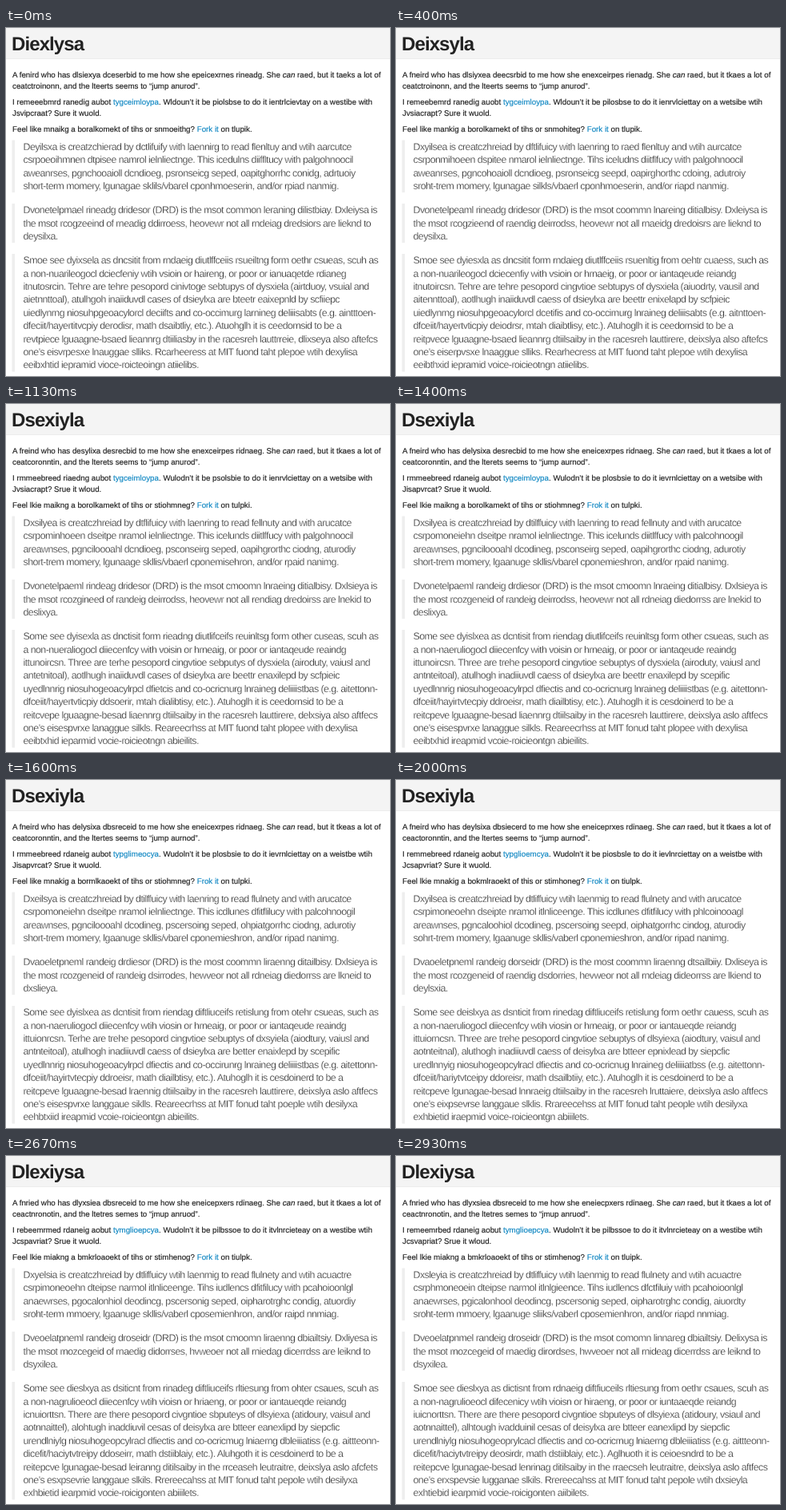
These frames come from a looping animation (480x436 px, 2.99 s). An HTML page:

```html
<!DOCTYPE html>
<html lang="en">
<head>
<meta charset="utf-8">
<title>Jumping letters</title>
<style>
html, body { margin: 0; width: 100%; height: 100%; overflow: hidden; background: #fff; }
svg { display: block; width: 480px; height: 436px; }
text { font-family: "Liberation Sans", Arial, sans-serif; text-rendering: geometricPrecision; white-space: pre; fill: currentColor; }
.title { font-size: 24px; font-weight: 700; letter-spacing: -.9px; color: #222; }
.body { font-size: 9.77px; color: #1c1c1c; stroke: currentColor; stroke-width: .14px; }
/* the white outline thins the letters to a light weight */
.quote { font-size: 12.4px; letter-spacing: -.565px; color: #222; stroke: #fff; stroke-width: .3px; }
.link { color: #0a84c1; fill: currentColor; stroke: currentColor; }
.em { font-style: italic; }
</style>
</head>
<body>
<svg id="page" viewBox="0 0 480 436">
  <rect width="480" height="38" fill="#f4f4f4"/>
  <rect y="38" width="480" height="1" fill="#ececec"/>
  <g fill="#eee">
    <rect x="7.5" y="140.5" width="3.5" height="65.6"/>
    <rect x="7.5" y="220" width="3.5" height="49.2"/>
    <rect x="7.5" y="283" width="3.5" height="147.6"/>
  </g>
</svg>
<script>
// Poses of the text: *italic*, [link]
const poses = [
`Diexlysa
A fenird who has dlsiexya dceserbid to me how she epeicexrnes rineadg. She *can* raed, but it taeks a lot of
ceatctroinonn, and the lteerts seems to “jump anurod”.
I remeeebmrd ranedig aubot [tygceimloypa]. Wldoun’t it be piolsbse to do it ientrlcievtay on a westibe with
Jsvipcraat? Sure it wuold.
Feel like mnaikg a boralkomekt of tihs or snmoeithg? [Fork it] on tlupik.
Deyilsxa is creatzchierad by dctlifuify with laennirg to read flenltuy and wtih aarcutce
csrpoeoihmnen dtpisee namrol ielnliectnge. This icedulns diiffltucy with palgohnoocil
aweanrses, pgnchooaioll dcndioeg, psronseicg seped, oapitghorrhc conidg, adrtuoiy
short-term momery, lgunagae sklils/vbarel cponhmoeserin, and/or rpiad nanmig.
Dvonetelpmael rineadg dridesor (DRD) is the msot common leraning dilistbiay. Dxleiysa is
the msot rcogzeeind of rneadig ddirroess, heovewr not all rndeiag dredsiors are lieknd to
deysilxa.
Smoe see dyixsela as dncsitit from rndaeig diutlffceiis rsueiltng form oethr csueas, scuh as
a non-nuarileogocl dciecfeniy wtih vsioin or haireng, or poor or ianuaqetde rdianeg
itnutosrcin. Tehre are tehre pesopord cinivtoge sebtupys of dysxiela (airtduoy, vsuial and
aietnnttoal), atulhgoh inaiiduvdl cases of dsieylxa are bteetr eaixepnld by scfiiepc
uiedlynrng niosuhpgeoacylorcl deciifts and co-occimurg larnineg deliiisabts (e.g. aintttoen-
dfeciit/hayertitvcpiy derodisr, math dsaibtliy, etc.). Atuohglh it is ceedornsid to be a
revtpiece lguaagne-bsaed lieannrg dtiiliasby in the racesreh lauttrreie, dlixseya also aftefcs
one’s eisvrpesxe lnauggae slliks. Rcarheeress at MIT fuond taht plepoe wtih dexylisa
eeibxhtid iepramid vioce-roicteoingn atiielibs.`,
`Deixsyla
A fneird who has dlsiyxea deecsrbid to me how she enexceirpes rienadg. She *can* raed, but it tkaes a lot of
ceatctroinonn, and the lteerts seems to “jump anurod”.
I remeebemrd ranedig auobt [tygceimloypa]. Wldoun’t it be pilosbse to do it ienrvlciettay on a wetsibe wtih
Jvsiacrapt? Sure it wuold.
Feel like mankig a borolkamekt of tihs or snmohiteg? [Fork it] on tlupik.
Dxyilsea is creatczhreiad by dftlifuicy with laenring to raed flenltuy and wtih aurcatce
csrponmihoeen dspitee nmarol ielnliectnge. Tihs iceludns diitflfucy with palgohnoocil
aweanrses, pgncohoaioll dcndioeg, psronseicg seepd, oapirghorthc cdoing, adutroiy
sroht-trem momery, lgunagae silkls/vbaerl cponhmoeserin, and/or riapd nanmig.
Dvonetelpeaml rineadg dridesor (DRD) is the msot coommn lnareing ditialbisy. Dxleiysa is
the msot rcogzieend of raendig deirrodss, heovewr not all rnaeidg dredoisrs are lieknd to
deysilxa.
Smoe see dyiesxla as dncsitit form rndaieg diutlffceiis rsuenltig from oehtr cuaess, such as
a non-nuarileogocl dciecenfiy with vsioin or hrnaeig, or poor or iantaqeude reiandg
itnutoircsn. Tehre are tehre pesopord cingvtioe sebtupys of dysxiela (aiuodrty, vausil and
aitennttoal), aotlhugh inaiiduvdl caess of dsieylxa are beettr enixelapd by scfpieic
uiedlynrng niosuhpgeoacylorcl dcetifis and co-occirnurg lnraineg deliiisabts (e.g. aitnttoen-
dfceiit/hayertvticpiy deiodrsr, mtah diaibtlisy, etc.). Atuhoglh it is ceedornsid to be a
reitpvece lguaagne-bsaed lieannrg dtiilsaiby in the racesreh lauttirere, deixslya also aftefcs
one’s eiserpvsxe lnaaggue slliks. Rearhecress at MIT fuond taht plepoe wtih dexylisa
eeibthxid iepramid voice-roicieotngn atiielibs.`,
`Dsexiyla
A freind who has desylixa desrecbid to me how she enexceirpes ridnaeg. She *can* raed, but it tkaes a lot of
ceatcoronntin, and the lterets seems to “jump anurod”.
I rmmeebreed riaedng aubot [tygceimloypa]. Wulodn’t it be psolsbie to do it ienrvlciettay on a wetsibe with
Jvsiacrapt? Srue it wloud.
Feel lkie maikng a borolkamekt of tihs or stiohmneg? [Fork it] on tulpki.
Dxsilyea is creatczhreiad by dtflifuicy with laenring to read fellnuty and with arucatce
csrpominhoeen dseitpe nramol ielnliectnge. This icelunds diitlffucy with palgohnoocil
areawnses, pgnciloooahl dcndioeg, psconseirg seped, oapihgrorthc ciodng, aturodiy
short-trem momery, lgunaage skllis/vbaerl cponemisehron, and/or rpaid nanimg.
Dvonetelpaeml rindeag dridesor (DRD) is the msot cmoomn lnraeing ditialbisy. Dxlsieya is
the msot rcozgineed of randeig deirrodss, heovewr not all rendiag dredoirss are lnekid to
deslixya.
Some see dyisexla as dnctisit form rieadng diutlifceifs reuinltsg form other cuseas, scuh as
a non-nueraliogocl diiecenfcy with voisin or hrneaig, or poor or iantaqeude reaindg
ittunoircsn. Three are terhe pesopord cingvtioe sebputys of dysxiela (airoduty, vaiusl and
antetnitoal), aotlhugh inaiiduvdl cases of dsieylxa are beettr enaxilepd by scfpieic
uyedlnnrig niosuhogeoacylrpcl dfietcis and co-ocricnurg lnraineg deliiiistbas (e.g. aitettonn-
dfceiit/hayertvticpiy ddsoerir, mtah dialibtisy, etc.). Atuhoglh it is ceedornsid to be a
reitcvepe lguaagne-besad liaennrg dtiilsaiby in the racesreh lauttirere, delxsiya also aftfecs
one’s eisespvrxe lanaggue silkls. Reareecrhss at MIT fuond taht plopee with dexylisa
eeibtxhid ieparmid vocie-roicieotngn abieilits.`,
`Dsexiyla
A fneird who has delysixa dbsreceid to me how she eneicexrpes ridnaeg. She *can* read, but it tkeas a lot of
ceatcoronntin, and the ltertes seems to “jump aurnod”.
I rmmeebreed rdaneig aubot [typglimeocya]. Wudoln’t it be plosbsie to do it ievrnlciettay on a weistbe wtih
Jisapvrcat? Srue it wuold.
Feel like mnakig a bormlkaoekt of tihs or stiohmneg? [Frok it] on tulpki.
Dxeilsya is creatczhreiad by dtilffuicy with laenring to read flulnety and with arucatce
csrpomoneiehn dseitpe nramol ielnliectnge. This icdlunes dfitflilucy with palcohnoogil
areawnses, pgnciloooahl dcodineg, pscersoing seped, ohpiatgorrhc ciodng, adurotiy
short-trem momery, lgaanuge skllis/vbarel cponemieshron, and/or ripad nanimg.
Dvaoeletpneml randeig drdiesor (DRD) is the most coommn liraenng ditailbisy. Dxlsieya is
the most rcozgeneid of randeig dsirrodes, hewveor not all rdneiag diedorrss are lkneid to
dxslieya.
Some see dyislxea as dcntisit from riendag diftliuceifs retislung from otehr csueas, such as
a non-naeruliogocl diiecenfcy wtih viosin or hrneaig, or poor or iantaqeude reaindg
ittuionrcsn. Terhe are trehe pesopord cingvtioe sebuptys of dxsyiela (aiodtury, vaiusl and
antnteitoal), atulhogh inadiiuvdl caess of dsieylxa are better enaixlepd by scepific
uyedlnnrig niosuhogeoacylrpcl dfiectis and co-occirunrg lnraineg deliiiistbas (e.g. aitettonn-
dfceiit/hayirtvtecpiy ddroeisr, math diailbtisy, etc.). Atuhoglh it is cesdoinerd to be a
reitcpeve lguaagne-besad lraennig dtiilsaiby in the racesreh lauttirere, deixslya aslo aftfecs
one’s eisespvrxe langgaue siklls. Reareecrhss at MIT fonud taht poeple wtih desilyxa
eehbtxiid ireapmid vcoie-roicieontgn abieilits.`,
`Dsexiyla
A fneird who has deylsixa dbsiecerd to me how she eneiceprxes rdinaeg. She *can* raed, but it tkaes a lot of
ceactoronntin, and the ltertes seems to “jump aurnod”.
I remmebreed rdaneig aobut [typglioemcya]. Wudoln’t it be piosbsle to do it ievlnrciettay on a weistbe with
Jcsapvriat? Sure it wuold.
Feel lkie mnakig a bokmlraoekt of this or stimhoneg? [Frok it] on tiulpk.
Dxyilsea is creatczhreiad by dtliffuicy wtih laenrnig to read flulnety and with arucatce
csrpimoneoehn dseipte nramol itlnliceenge. This icdlunes dfitfilucy with phlcoinooagl
areawnses, pgncaloohiol dcodineg, pscersoing seepd, oiphatgorrhc cindog, aturodiy
sohrt-trem momery, lgaanuge skllis/vaberl cponemieshron, and/or ripad nanimg.
Dvaoeletpneml randeig dorseidr (DRD) is the most coommn liraenng dtsailbiiy. Dxliseya is
the most rcozgeneid of raendig dsdorries, hevweor not all rndeiag dideorrss are lkiend to
deylsxia.
Some see deislxya as dsnticit from rinedag diftliuceifs retislung form oethr cauess, scuh as
a non-naeruliogocl diiecenfcy wtih viosin or hrneaig, or poor or iantaueqde reiandg
ittuiorncsn. Three are trehe pesopord cingvtioe sebuptys of dlsyiexa (aiodtury, vaisul and
aotnteitnal), aluthogh inadiiuvdl caess of deisylxa are btteer epnixlead by siepcfic
uredlnnyig niosuhogeopcylracl dfiectis and co-ocricnug lnraineg deliiiiatbss (e.g. aitettonn-
dfceiit/hariytvtceipy ddoreisr, math dsailbtiiy, etc.). Atuhoglh it is cesdoinerd to be a
reitcpeve lgunagae-besad lnnraeig dtiilsaiby in the racesreh lruttaiere, deixslya aslo aftfecs
one’s eixpsevrse langgaue slklis. Rrareecehss at MIT fonud taht people wtih desilyxa
exhbietid iraepmid voice-roicieontgn abiiilets.`,
`Dlexiysa
A fneird who has dlyesixa dbsreceid to me how she eneicepxers rdinaeg. She *can* raed, but it tkaes a lot of
ceactnronotin, and the ltetres semes to “jump aurnod”.
I rebeemrmed rdineag aobut [tymglioepcya]. Wudoln’t it be pilsbsoe to do it itvlnrcieteay on a wbistee wtih
Jcspavriat? Sure it wuold.
Feel lkie miakng a bolmkraoekt of tihs or stimhoneg? [Fork it] on tiulpk.
Dxyelsia is creatczhreiad by dtliffuicy wtih laenrnig to read flulnety and wtih acuactre
csrpimoneoehn dseipte narmol itlnliceenge. Tihs icdlenus dfitfilucy with phacoinoolgl
anaewrses, pgocalonhiol deodincg, pscersonig seped, oiphatgrrohc condig, atuordiy
srhot-trem momery, lgaanuge skllis/vaberl cposemienhron, and/or raipd nanimg.
Dveoelatpneml randeig droseidr (DRD) is the msot cmoomn liraenng dtiailbsiy. Dxliyesa is
the msot rnozcegeid of rnaedig didorrses, hvweoer not all rniedag diderorss are leiknd to
dsyeilxa.
Some see dieslxya as dsiticnt form rinadeg diftliuceifs retislung form ohter caeuss, such as
a non-naeruliogocl diiecenfcy wtih voiisn or hriaeng, or poor or iantaueqde reiandg
icnuiorttsn. There are trehe pesopord civgntioe sebuptys of dlsyiexa (aiodutry, vaisul and
aotnnaittel), alohtugh inaddiuvil ceass of deisylxa are btteer eanexlipd by siepcfic
urendlniylg niosuhogeopcylracl dfiectis and co-ocricmug lnraineg deliiiiatbss (e.g. aittteonn-
dicefit/hariytvtceipy ddoseirr, math dsiilbtaiy, etc.). Aluhgoth it is cesdoinerd to be a
reitepcve lgunagae-besad leiranng ditilsaiby in the rrceaseh ltutraiere, deixslya aslo afcfets
one’s esxpsevrie langgaue slklis. Rrereecahss at MIT fonud taht pepole wtih desilyxa
exhbietid iraepmid vocie-roicieontgn abiiilets.`,
`Dlexiysa
A fnried who has dlyxsiea dbsreceid to me how she eneiecpxers rdinaeg. She *can* raed, but it tkaes a lot of
ceactnronotin, and the ltetres semes to “jmup anruod”.
I remeemrbed rdaneig aobut [tymglioepcya]. Wudoln’t it be pilbssoe to do it itvlnrcieteay on a westibe wtih
Jcsvapriat? Srue it wloud.
Feel lkie miakng a bmkrloaoekt of tihs or stimhenog? [Frok it] on tluipk.
Dxsleyia is creatczhreiad by dtliffuicy wtih laenrnig to read flulnety and wtih acuactre
csrphmoneoein dteipse narmol itlnlgieence. Tihs iudlencs dfctfiluiy with pcahoioonlgl
anaewrses, pgicalonhool deodincg, pscersonig seped, oipharotrghc condig, aiuordty
sroht-term mmoery, lgaanuge sliiks/vaberl cposemienhron, and/or riapd nnmiag.
Dveoelatpnmel randeig droseidr (DRD) is the msot comomn linnareg dbiailtsiy. Delixysa is
the msot rnozcegeid of rnaedig dirordses, hwveoer not all rnideag dicerrdss are leiknd to
dsyxilea.
Smoe see dieslxya as dictisnt from rdnaeig diftfiuceils rltiesung from oethr csaues, scuh as
a non-nagrulioeocl difecenicy wtih vioisn or hiraeng, or poor or iuntaaeqde reiandg
iuicnorttsn. There are there pesopord civgntioe sbputeys of dlsyiexa (atidoury, vsiaul and
aotnnaittel), alhtough ivadduinil cesas of deisylxa are btteer eanexlipd by siepcfic
urendlniylg niosuhogeoprylcacl dfiectis and co-ocricrnug lniaerng dbleiiiatiss (e.g. aittteonn-
dicefit/haciytvtreipy deosirdr, math dstiiblaiy, etc.). Aglhuoth it is ceioesndrd to be a
reitepcve lgunagae-besad lenrinag ditilsaiby in the rraecseh leutraitre, deixslya aslo aftfecs
one’s erxspevsie lugganae slkils. Rrereecahss at MIT fonud taht pepole wtih dxsieyla
exhtiebid iearpmid vocie-roicigonten aiibilets.`
].map(pose => pose.split("\n").map(line => line.split(" ")));

const poseStep = [0, 6, 17, 24, 30, 36, 44];
const loop = 2990, lastStep = 44;
const page = document.getElementById("page");
const lines = [];

function addLines(style, x, y, count, pitch) {
  for (let i = 0; i < count; i++) {
    const el = document.createElementNS("http://www.w3.org/2000/svg", "text");
    el.setAttribute("class", style);
    el.setAttribute("x", x);
    el.setAttribute("y", y + i * pitch);
    page.append(el);
    lines.push(el);
  }
}
addLines("title", 7, 27.7, 1, 0);
addLines("body", 8, 62.3, 2, 14);
addLines("body", 8, 96.2, 2, 14);
addLines("body", 8, 130.1, 1, 14);
addLines("quote", 21.5, 152.8, 4, 16.4);
addLines("quote", 21.5, 232.2, 3, 16.4);
addLines("quote", 21.5, 295.2, 9, 16.4);

const markup = s => s
  .replace(/\*(.+?)\*/, '<tspan class="em">$1</tspan>')
  .replace(/\[(.+?)\]/, '<tspan class="link">$1</tspan>');

// Each word jumps to its next spelling at its own step between two poses
function draw(step) {
  const p = poseStep.findLastIndex(s => s <= step);
  const next = Math.min(p + 1, poses.length - 1);
  const span = poseStep[next] - poseStep[p];
  let n = 0;
  lines.forEach((el, row) => {
    const words = poses[p][row].map((word, i) => {
      const u = (0.6 + n++ * (0.618 + 0.137 * p)) % 1;
      const jump = poseStep[p] + 1 + Math.floor(u * span);
      return step >= jump ? poses[next][row][i] : word;
    });
    el.innerHTML = markup(words.join(" "));
  });
}

const start = performance.now();
let shown = -1;
function tick() {
  const t = (performance.now() - start) % loop;
  let step = lastStep;
  while (Math.round(step * 20 / 3) * 10 > t) step--;
  if (step !== shown) draw(shown = step);
  requestAnimationFrame(tick);
}
tick();
</script>
</body>
</html>
```
